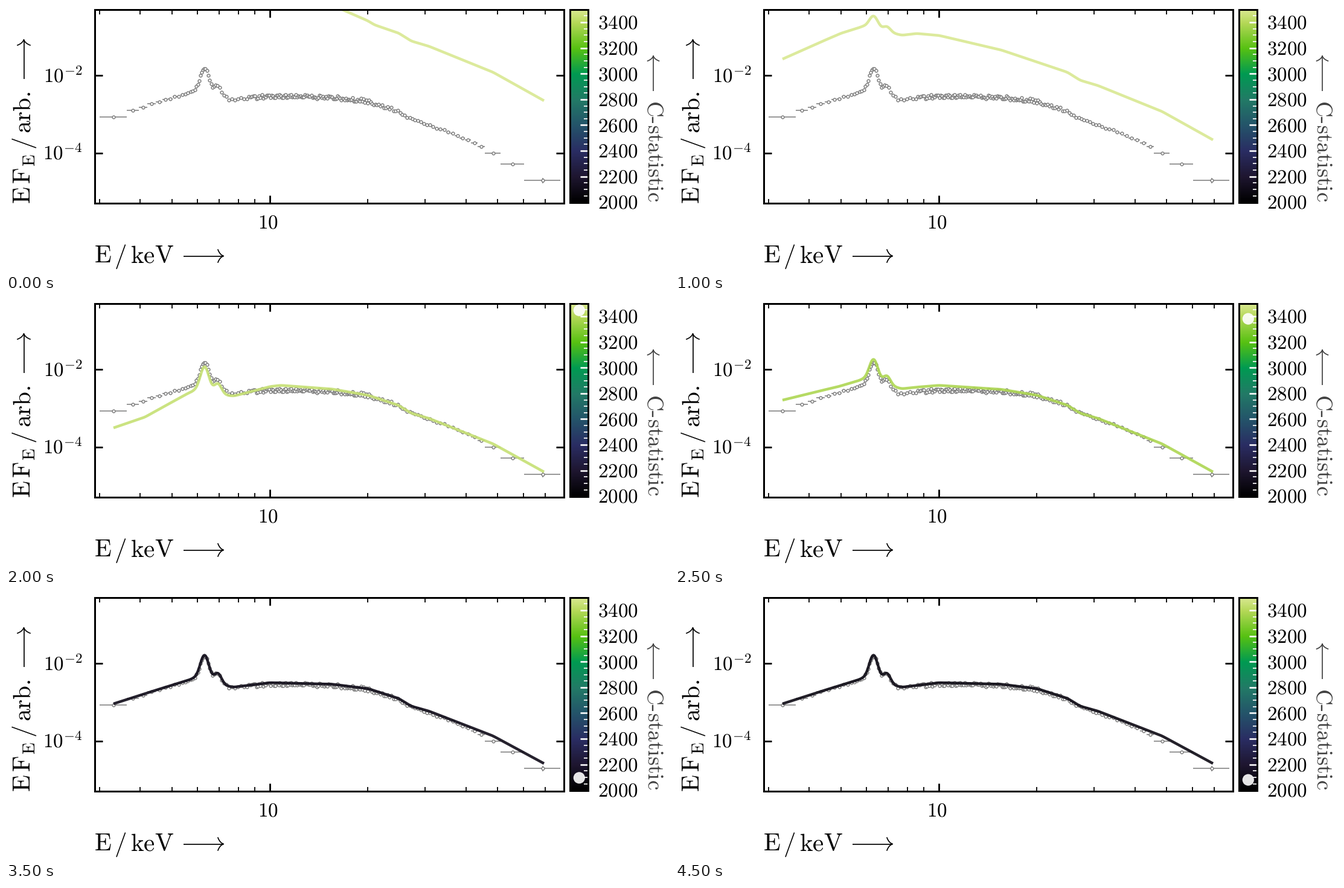
Animation of 1098x441 px, one loop 5 s. Source, as a matplotlib script:

```python
import matplotlib.pyplot as plt
import numpy as np
from matplotlib.animation import FuncAnimation
from matplotlib.colors import LinearSegmentedColormap
from matplotlib.patches import Circle, PathPatch, Rectangle
from matplotlib.path import Path

plt.rcParams["mathtext.fontset"] = "cm"
plt.rcParams["text.hinting"] = "none"

W, H, DPI = 1098, 441, 72
LEFT, RIGHT, TOP, BOTTOM = 147, 924, 6, 327
BAR_LEFT, BAR_RIGHT, BAR_BOTTOM = 934, 964, 326
GREY, SOFT = "#808080", "#404040"

COLORS = ["#000000", "#1e1630", "#2a2d63", "#24546a", "#227a66", "#009a52",
          "#57c112", "#b5d858", "#d9e891"]
RAINFOREST = LinearSegmentedColormap.from_list("rainforest", [
    (min(i * 200 / 1500, 1), c) for i, c in enumerate(COLORS)], N=512)

fig = plt.figure(figsize=(W / DPI, H / DPI), dpi=DPI, facecolor="white")
ax = fig.add_axes([0, 0, 1, 1])


def energy_px(e):
    return 437 + 539.3 * np.log10(e / 10)


def stat_px(c):
    return 325.2 - (c - 2000) * 0.2129


def through(points, x):
    """Interpolate linearly through (x, y) key points."""
    return np.interp(x, *zip(*points))


def label(x, y, tex, size, **kw):
    ax.text(x, y, rf"$\mathrm{{{tex}}}$", fontsize=size, va="baseline",
            rotation_mode="anchor", **kw)


def segment(x0, y0, x1, y1, width, color="black", z=6):
    ax.plot([x0, x1], [y0, y1], color=color, lw=width, zorder=z,
            solid_capstyle="butt")


def box(x0, y0, x1, y1):
    return ax.add_patch(Rectangle((x0, y0), x1 - x0, y1 - y0, fill=False,
                                  ec="black", lw=3, zorder=7))


def arrow(tail, tip, em, color="black"):
    """Long thin arrow with curved barbs."""
    tail, tip = np.array(tail), np.array(tip)
    along = (tip - tail) / np.hypot(*(tip - tail))
    across = np.array([-along[1], along[0]])
    barbs = []
    for side in (1, -1):
        barbs += [tip - along * 0.22 * em + across * side * 0.26 * em,
                  tip - along * 0.15 * em + across * side * 0.06 * em, tip]
    codes = [Path.MOVETO, Path.CURVE3, Path.CURVE3] * 2
    ax.add_patch(PathPatch(Path(barbs, codes), fill=False, ec=color, lw=1.7,
                           capstyle="round"))
    segment(*tail, *tip, 1.7, color)


# Spectrum in stage pixels: a smooth continuum with two emission lines
CONTINUUM = [(178, 182), (240, 162), (311, 140), (376, 154.5), (437, 147),
             (540, 149.5), (600, 157), (650, 173), (671, 186), (700, 194),
             (806, 235), (891, 281)]
xs = np.arange(178, 891.5)


def smooth(y, sigma=3, n=9):
    kernel = np.exp(-0.5 * (np.arange(-n, n + 1) / sigma) ** 2)
    padded = np.pad(y, n, mode="reflect", reflect_type="odd")
    return np.convolve(padded, kernel / kernel.sum(), mode="valid")


def bell(center, sigma):
    return np.exp(-0.5 * ((xs - center) / sigma) ** 2)


def spectrum(shift=((178, 0),), line_gain=1.0):
    lines = 42.5 * bell(329, 7.4) + 17 * bell(351, 6)
    level = smooth(through(CONTINUUM, xs) + through(shift, xs))
    return level - line_gain * lines


best = spectrum()
start = spectrum([(178, -230), (546, -149), (610, -129), (891, -124)], 0.5)
high = spectrum([(178, -94), (275, -106), (400, -106), (600, -64),
                 (891, -59)], 0.5)
near = spectrum([(178, -55), (400, -43), (478, -34), (640, -33),
                 (705, -40), (891, -38)], 0.95)
low = spectrum([(178, 30), (230, 29), (300, 12), (384, 4), (455, -6),
                (600, 1), (891, 4)])
close = spectrum([(178, -16), (270, -9), (400, -7), (600, 1), (891, 4)], 0.88)

# Model curve and C-statistic at each step; values above 3500 are off the bar
STEPS = [(start, 9000), ((start + high) / 2, 8000), (high, 7000),
         (near, 5000), (low, 3447), (close, 3381),
         (0.65 * best + 0.35 * close, 2330),
         (best, 2096), (best, 2085), (best, 2080)]


def walk(edge, stop, widths):
    """Bin edges from one end, each bin as wide as its outer edge asks."""
    sign = np.sign(stop - edge)
    edges = [edge]
    while (stop - edges[-1]) * sign > 0:
        edges.append(edges[-1] + sign * through(widths, edges[-1]))
    return edges


def draw_data():
    rng = np.random.default_rng(4)
    rising = walk(155, 500, [(155, 45), (200, 20), (220, 14), (234, 14),
                             (268, 7.5), (304, 4), (318, 2), (340, 2.4),
                             (372, 5), (395, 5), (400, 2.6), (440, 1.9)])
    falling = walk(918, rising[-1] + 1, [(580, 1.9), (640, 3.3), (710, 5.5),
                                         (751, 8), (793, 12), (819, 26),
                                         (858, 39), (918, 60)])
    edges = np.array(rising + falling[::-1][1:])
    width = np.diff(edges)
    x = edges[:-1] + 0.52 * width
    spread = through([(178, 0.5), (300, 0.8), (400, 2.2), (640, 2), (800, 0)], x)
    excess = through([(178, 1.5), (400, 0.5), (450, 2), (550, 2), (600, 0.5),
                      (775, 3), (806, 9), (891, 9)], x)
    y = np.interp(x, xs, best) + excess + spread * rng.uniform(-1.6, 1.6, x.size)
    ax.hlines(y, edges[:-1], edges[1:], color=GREY, lw=1.6, zorder=2)
    segment(x[-1], y[-1] - 4.5, x[-1], y[-1] + 4.5, 1.6, GREY, 2)
    ax.plot(x, y, "o", ms=4.8, mfc="white", mec=GREY, mew=1.5, zorder=3)


def draw_axes():
    for e in [*range(3, 10), *range(10, 80, 10)]:
        length, width = (13, 2.8) if e == 10 else (7.5, 1.8)
        x = energy_px(e)
        segment(x, TOP, x, TOP + length, width)
        segment(x, BOTTOM, x, BOTTOM - length, width)
    for y, power in ((115, -2), (243.6, -4)):
        segment(LEFT, y, LEFT + 13, y, 2.8)
        segment(RIGHT, y, RIGHT - 13, y, 2.8)
        label(126.5, y + 12, f"10^{{{power}}}", 33, ha="right")
    label(433.5, 369, "10", 33, ha="center")

    label(145.5, 425.5, r"E\,/\,keV", 41)
    arrow((294, 414.5), (360, 414.5), 41)
    label(40.5, 328, r"E\,F_E\,/\,arb.", 41, rotation=90)
    arrow((29.5, 121), (29.5, 56), 41)


def draw_colorbar():
    ramp = np.linspace(1, 0, 512)[:, None]
    ax.imshow(ramp, cmap=RAINFOREST, vmin=0, vmax=1, aspect="auto", zorder=1,
              extent=(BAR_LEFT, BAR_RIGHT, BAR_BOTTOM, TOP))
    for c in range(2050, 3500, 50):
        length, width = (13, 2.6) if c % 200 == 0 else (7.5, 1.7)
        segment(BAR_RIGHT - length, stat_px(c), BAR_RIGHT, stat_px(c),
                width, "white", 4)
    for c in range(2000, 3401, 200):
        label(979.5, stat_px(c) + 11.5, str(c), 33)

    label(1062.5, 156, "C", 37, rotation=-90, color=SOFT)
    segment(1071, 183.5, 1071, 193.5, 2.4, SOFT)
    label(1062.5, 195.5, "statistic", 37, rotation=-90, color=SOFT)
    arrow((1072, 141), (1072, 83), 37, SOFT)


draw_data()
draw_axes()
draw_colorbar()
frame = box(LEFT, TOP, RIGHT, BOTTOM)
box(BAR_LEFT, TOP, BAR_RIGHT, BAR_BOTTOM)

model, = ax.plot([], [], lw=4.5, alpha=0.9, zorder=5, solid_capstyle="butt",
                 solid_joinstyle="round")
model.set_clip_path(frame)
dot = Circle((949.3, 0), 9.6, fc="white", ec="none", alpha=0.9, zorder=8)
ax.add_patch(dot)

ax.set_xlim(0, W)
ax.set_ylim(H, 0)
ax.axis("off")


def update(i):
    curve, stat = STEPS[i]
    model.set_data(xs, curve)
    model.set_color(RAINFOREST(min((stat - 2000) / 1500, 1.0)))
    dot.set_visible(stat <= 3500)
    dot.center = (949.3, stat_px(stat))
    return model, dot


anim = FuncAnimation(fig, update, frames=len(STEPS), interval=500,
                     init_func=lambda: update(0), repeat=True, repeat_delay=0)
plt.show()
```
